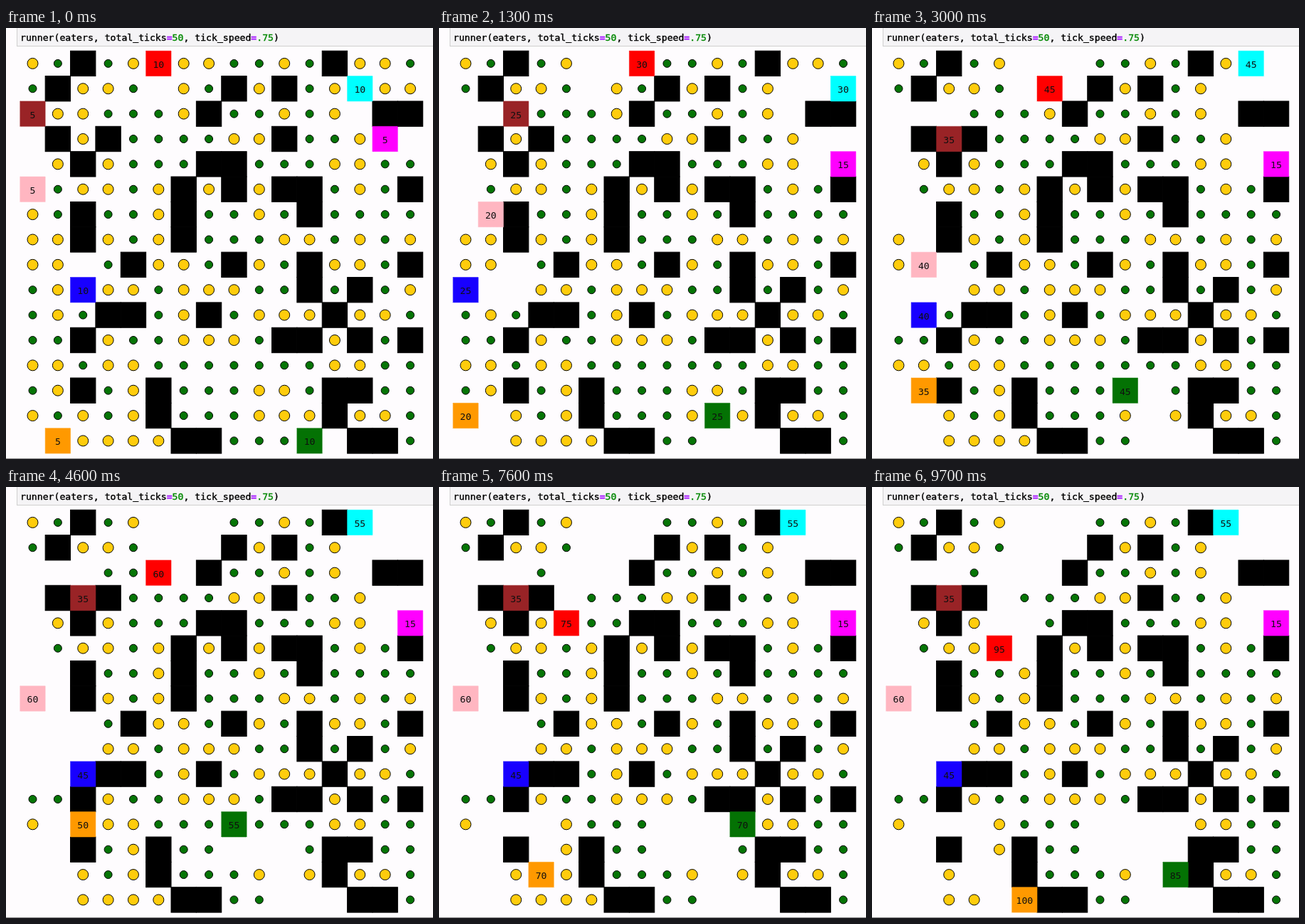
These frames come from a looping animation (600x606 px, 9800 ms). An HTML page with a canvas:

```html
<!DOCTYPE html>
<html lang="en">
<head>
<meta charset="utf-8">
<title>Eaters</title>
<style>
  html, body { margin: 0; width: 100%; height: 100%; overflow: hidden; background: #fefcfe; }
  canvas { display: block; }
</style>
</head>
<body>
<canvas id="stage" width="600" height="606"></canvas>
<script>
const ctx = document.getElementById('stage').getContext('2d');
const LOOP = 9800, FIRST_TICK = 390, TICK = 832;
const LEFT = 19.8, TOP = 32.2, CELL = 35.37;
const FONT = '13.15px "DejaVu Sans Mono", monospace';

// '#' wall, 'o' gold (10 points), '.' green (5 points)
const BOARD = [
  'o.#.o oo..o.#oo.',
  '.#oo. o.#o#.o oo',
  ' oo...o#..o.o ##',
  ' #o#....oo#..o  ',
  ' o#o...##...oo..',
  ' .oo.o#o#o##.o.#',
  'o.#..o#..o.#....',
  'oo#o.o#...oo.o.o',
  'oo .#oo.#o.#oo.#',
  '.o oo.ooo..#.#.o',
  '.o.##.o#.ooo#oo.',
  '..#o..ooo.##o#.#',
  'oo.oo.......oo..',
  '.o#.o#...oo.##..',
  'o.o.o#...ooo#oo.',
  '  oooo##...  ##.'
];
const POINTS = { o: 10, '.': 5 };
const STEPS = { L: [-1, 0], R: [1, 0], U: [0, -1], D: [0, 1] };
const EATERS = [
  { color: '#ff0000', col: 5, row: 0, score: 10, path: 'RRDLDLLDDRDL' },
  { color: '#00ffff', col: 13, row: 1, score: 10, path: 'RRULL' },
  { color: '#992326', col: 0, row: 2, score: 5, path: 'RRD' },
  { color: '#ff00ff', col: 14, row: 3, score: 5, path: 'DR' },
  { color: '#ffb6c1', col: 0, row: 5, score: 5, path: 'DRDDLU' },
  { color: '#1800ff', col: 2, row: 9, score: 10, path: 'LLDRR' },
  { color: '#ff9900', col: 1, row: 15, score: 5, path: 'ULURURRDDRDR' },
  { color: '#047204', col: 11, row: 15, score: 10, path: 'LUULLURRRDD' }
];

function stateAt(ticks) {
  const grid = BOARD.map(line => [...line]);
  const eaters = EATERS.map(({ color, col, row, score, path }) => {
    for (const move of path.slice(0, ticks)) {
      col += STEPS[move][0];
      row += STEPS[move][1];
      score += POINTS[grid[row][col]] || 0;
      grid[row][col] = ' ';
    }
    return { color, col, row, score };
  });
  return { grid, eaters };
}

function drawCell(col, row, color, dash = []) {
  const box = [LEFT + col * CELL, TOP + row * CELL, CELL, CELL];
  ctx.fillStyle = ctx.strokeStyle = color;
  ctx.lineWidth = 1;
  ctx.setLineDash(dash);
  ctx.fillRect(...box);
  ctx.strokeRect(...box);
  ctx.setLineDash([]);
}

function drawPellet(col, row, kind) {
  const gold = kind === 'o';
  ctx.beginPath();
  ctx.arc(LEFT + (col + 0.5) * CELL, TOP + (row + 0.5) * CELL, gold ? 7.5 : 5.5, 0, Math.PI * 2);
  ctx.fillStyle = gold ? '#ffcc0c' : '#067506';
  ctx.fill();
  ctx.strokeStyle = '#000';
  ctx.lineWidth = 1;
  ctx.stroke();
}

function drawEater({ color, col, row, score }) {
  drawCell(col, row, color, [1, 1]);
  ctx.font = FONT;
  ctx.textAlign = 'center';
  ctx.fillStyle = '#101010';
  ctx.fillText(score, LEFT + (col + 0.5) * CELL, Math.round(TOP + row * CELL + 23.6));
}

function drawHeader() {
  ctx.fillStyle = '#f5f4f6';
  ctx.fillRect(15, 0, 585, 25);
  ctx.fillStyle = '#cfcfcf';
  ctx.fillRect(15, 0, 1, 26);
  ctx.fillRect(15, 25, 585, 1);
  ctx.textAlign = 'left';
  ctx.lineWidth = 0.4;
  let x = 20;
  const parts = [
    ['runner(eaters, total_ticks', '#000'], ['=', '#aa22ff', 'bold '], ['50', '#008800'],
    [', tick_speed', '#000'], ['=', '#aa22ff', 'bold '], ['.75', '#008800'], [')', '#000']
  ];
  for (const [text, color, weight = ''] of parts) {
    ctx.font = weight + FONT;
    ctx.fillStyle = ctx.strokeStyle = color;
    ctx.fillText(text, x, 18);
    ctx.strokeText(text, x, 18);
    x += ctx.measureText(text).width;
  }
}

function draw(ticks) {
  const { grid, eaters } = stateAt(ticks);
  ctx.fillStyle = '#fefcfe';
  ctx.fillRect(0, 0, 600, 606);
  drawHeader();
  grid.forEach((line, row) => line.forEach((kind, col) => {
    if (kind === '#') drawCell(col, row, '#000');
    else if (kind !== ' ') drawPellet(col, row, kind);
  }));
  eaters.forEach(drawEater);
  ctx.fillStyle = '#8c8b8c';
  ctx.fillRect(0, 605, 600, 1);
}

function frame() {
  const t = performance.now() % LOOP;
  draw(Math.max(0, Math.floor((t - FIRST_TICK) / TICK) + 1));
  requestAnimationFrame(frame);
}
frame();
</script>
</body>
</html>
```
